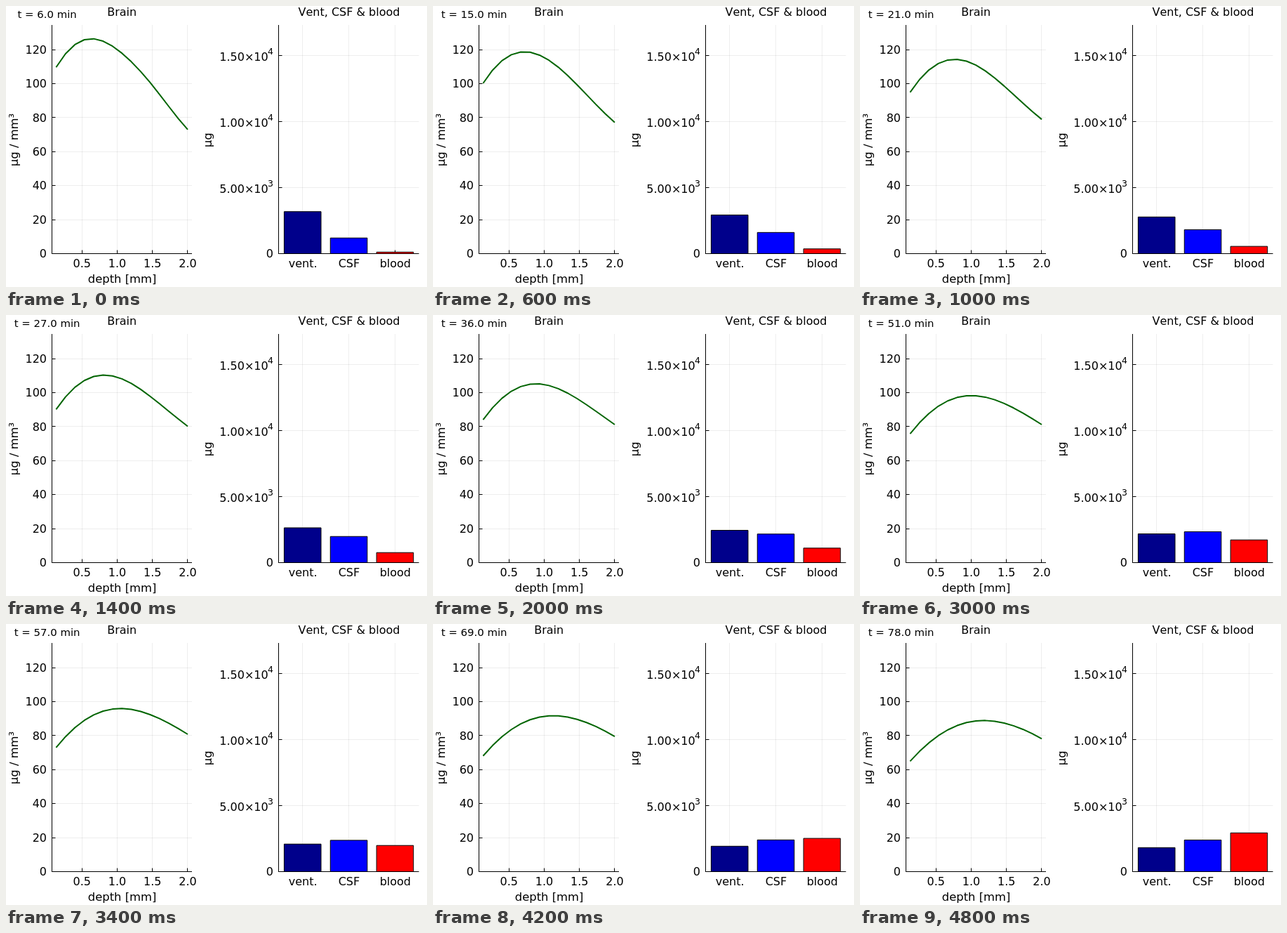
Animation of 600x400 px, one loop 5 s. Source, as an HTML page with a canvas:

```html
<!DOCTYPE html>
<html lang="en">
<head>
<meta charset="utf-8">
<title>Brain, Vent, CSF &amp; blood</title>
<style>
  html, body { margin: 0; width: 100%; height: 100%; overflow: hidden; background: #fff; }
  canvas { display: block; width: 600px; height: 400px; }
</style>
</head>
<body>
<canvas id="stage" width="600" height="400"></canvas>
<script>
const ctx = document.getElementById('stage').getContext('2d');
const STEP_MS = 200, STEPS = 25, POINTS = 15;
const TOP = 27, BASE = 352.5;

// Concentration over depth: a sum of cosine modes, each fading at its own rate.
const modes = [
  { amp: 279.5, freq: 0.0881, peak: 9.52, rate: 0.0104 },
  { amp: 80, freq: 0.236, peak: 1.1, rate: 0.0793 },
  { amp: 4, freq: 0.5, peak: 10.14, rate: 0.35 },
  { amp: 1.5, freq: 0.7, peak: 11.49, rate: 0.7 }
];
const concentration = (i, step) => modes.reduce((sum, m) =>
  sum + m.amp * Math.cos(m.freq * (i - m.peak)) * Math.exp(-m.rate * step), 0);

// Bar heights: the ventricle drains through the CSF into the blood.
const bars = [
  { name: 'vent.', color: '#00008b', height: s => 19 + 40.8 * Math.exp(-0.0412 * s) },
  { name: 'CSF', color: '#0000ff', height: s => 62 - 0.5165 * s - 39.7 * Math.exp(-0.09 * s) },
  { name: 'blood', color: '#ff0000', height: s => -11.9 + 2.74 * s + 14.1 * Math.exp(-0.1 * s) }
];

const ticks = (count, start, gap) => Array.from({ length: count }, (_, i) => start + i * gap);
const crisp = v => Math.floor(v) + 0.5;

function text(str, x, y, align = 'center', size = 16) {
  ctx.font = `${size}px "DejaVu Sans", sans-serif`;
  ctx.textAlign = align;
  ctx.fillStyle = '#000';
  ctx.fillText(str, x, y);
}

function upright(str, x, y, size) {
  ctx.save();
  ctx.translate(x, y);
  ctx.rotate(-Math.PI / 2);
  text(str, 0, 0, 'center', size);
  ctx.restore();
}

function line(x1, y1, x2, y2, color = '#000') {
  ctx.strokeStyle = color;
  ctx.lineWidth = 1;
  ctx.beginPath();
  ctx.moveTo(x1, y1);
  ctx.lineTo(x2, y2);
  ctx.stroke();
}

function axes(left, right, xTicks, yTicks) {
  const grid = 'rgba(0, 0, 0, 0.065)';
  xTicks.forEach(x => line(crisp(x), TOP, crisp(x), BASE, grid));
  yTicks.forEach(y => line(left, crisp(y), right, crisp(y), grid));
  line(left, TOP, left, BASE + 0.5);
  line(left, BASE, right, BASE);
  xTicks.forEach(x => line(crisp(x), BASE, crisp(x), BASE - 5));
  yTicks.forEach(y => line(left, crisp(y), left + 5, crisp(y)));
}

function brain(step) {
  const xTicks = ticks(4, 108.2, 50.25);
  const yTicks = ticks(7, BASE, -48.4);
  axes(65.5, 265, xTicks, yTicks);
  xTicks.forEach((x, i) => text(((i + 1) / 2).toFixed(1), x, 372));
  yTicks.forEach((y, i) => text(i * 20, 58, y + 5.7, 'right'));
  text('Brain', 165.2, 14);
  text('depth [mm]', 165.6, 393.5, 'center', 16.4);
  upright('µg / mm³', 16.5, 190.5, 16.4);
  text(`t = ${(6 + 3 * step).toFixed(1)} min`, 58.6, 17, 'center', 14.9);

  ctx.strokeStyle = '#006400';
  ctx.lineWidth = 2;
  ctx.lineJoin = 'round';
  ctx.beginPath();
  for (let i = 0; i < POINTS; i++) ctx.lineTo(71.4 + i * 13.4, BASE - concentration(i, step));
  ctx.stroke();
}

function fluids(step) {
  const xTicks = ticks(bars.length, 422.7, 65.85);
  const yTicks = ticks(4, BASE, -94.1);
  axes(388.5, 588.5, xTicks, yTicks);
  text('0', 381, BASE + 5.7, 'right');
  yTicks.slice(1).forEach((y, i) => {
    const value = 5000 * (i + 1);
    const exp = Math.floor(Math.log10(value));
    text((value / 10 ** exp).toFixed(2) + '×10', 373.7, Math.round(y + 7.5), 'right');
    text(exp, 381, y - 1.6, 'right', 12.5);
  });
  text('Vent, CSF & blood', 489, 14);
  upright('µg', 293, 190.8, 16.4);

  bars.forEach(({ name, color, height }, i) => {
    const x = xTicks[i], h = height(step);
    ctx.fillStyle = color;
    ctx.strokeStyle = '#000';
    ctx.lineWidth = 1;
    ctx.beginPath();
    ctx.rect(x - 26.3, BASE - h, 52.6, h);
    ctx.fill();
    ctx.stroke();
    text(name, x + 0.4, 372);
  });
}

function draw() {
  const step = Math.floor(performance.now() / STEP_MS) % STEPS;
  ctx.fillStyle = '#fff';
  ctx.fillRect(0, 0, 600, 400);
  brain(step);
  fluids(step);
  requestAnimationFrame(draw);
}

ctx.fontKerning = 'none';
draw();
</script>
</body>
</html>
```
